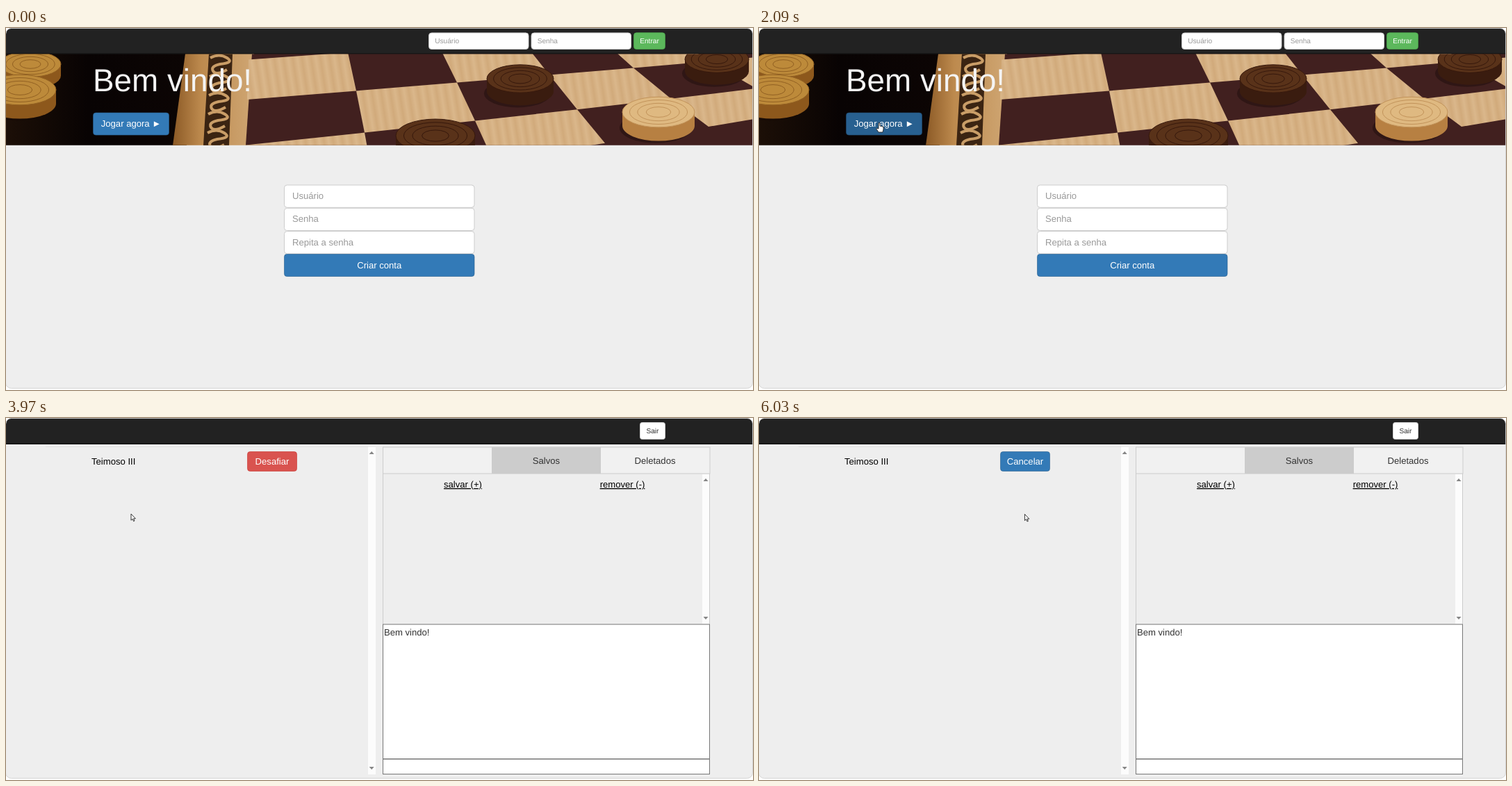
These frames come from a looping animation (1075x521 px, 8 s). An HTML page:

```html
<!DOCTYPE html>
<html lang="pt">
<head>
<meta charset="utf-8">
<title>Damas</title>
<style>
  html, body { margin: 0; width: 100%; height: 100%; overflow: hidden; background: #fff; }
  svg { display: block; font: 13.1px "Liberation Sans", Arial, sans-serif; fill: #333; text-rendering: geometricPrecision; }
  .small { font-size: 10.15px; }
  .mid { text-anchor: middle; }
  .hint { fill: #999; }
  .white { fill: #fff; }
  .field { fill: #fff; stroke: #ccc; }
  .link { fill: #000; text-decoration: underline; }
  .bar { fill: #fcfcfc; }
  .tri { fill: #858585; }
  .box { fill: #fff; stroke: #767676; }
  .pointer { fill: #fff; stroke: #222; stroke-width: .9; stroke-linejoin: round; }
</style>
</head>
<body>
<svg width="1075" height="521" viewBox="0 0 1075 521">
  <defs>
    <clipPath id="page"><rect y=".5" width="1074.5" height="518" rx="8"/></clipPath>
    <clipPath id="strip"><rect y="37.5" width="1074.5" height="131.2"/></clipPath>
    <linearGradient id="grain" gradientUnits="userSpaceOnUse" x2="13" y2="-2" spreadMethod="repeat">
      <stop stop-color="#dab78b"/><stop offset=".5" stop-color="#d1aa7b"/><stop offset="1" stop-color="#dab78b"/>
    </linearGradient>
    <linearGradient id="rim">
      <stop stop-color="#8c5a26"/><stop offset=".35" stop-color="#bd8a4e"/><stop offset="1" stop-color="#cfa673"/>
    </linearGradient>
    <linearGradient id="shade">
      <stop stop-color="#1c0f07"/><stop offset=".45" stop-color="#080303"/><stop offset="1" stop-color="#0c0504"/>
    </linearGradient>
  </defs>

  <g clip-path="url(#page)">
    <rect width="1075" height="521" fill="#eee"/>
    <rect width="1075" height="38" fill="#222"/>
    <rect y="36.5" width="1075" height="1" fill="#0c0c0c"/>
  </g>

  <g id="home">
    <g id="photo" clip-path="url(#strip)"></g>
    <g id="forms"></g>
    <text x="125" y="91" font-size="45.8" fill="#f4f4f4">Bem vindo!</text>
    <g id="play"></g>
  </g>

  <g id="lobby">
    <rect class="field" x="912.5" y="6.5" width="36" height="24" rx="3"/>
    <text class="small mid" x="930.5" y="22">Sair</text>

    <path d="M57 41.5H521" stroke="#e2e2e2"/>
    <text x="123" y="67" fill="#000">Teimoso III</text>
    <g id="duel"></g>
    <rect class="bar" x="521" y="42" width="11" height="471"/>
    <path class="tri" d="M522.7 52h7l-3.5-4zM522.7 502h7l-3.5 4z"/>

    <rect x="542.5" y="42" width="470.5" height="38" fill="#f1f1f1" stroke="#ccc"/>
    <rect x="699" y="42" width="157" height="38" fill="#ccc"/>
    <text class="mid" x="777.5" y="65.5">Salvos</text>
    <text class="mid" x="934" y="65.5">Deletados</text>
    <path d="M542.5 80V296.5M1012.5 80V296.5" stroke="#ccc"/>
    <rect class="bar" x="1002" y="81" width="10" height="215"/>
    <path class="tri" d="M1003.5 91h7l-3.5-4zM1003.5 286h7l-3.5 4z"/>
    <text class="link mid" x="657.5" y="100">salvar (+)</text>
    <text class="link mid" x="887" y="100">remover (-)</text>

    <rect class="box" x="542.5" y="297" width="470" height="193.5"/>
    <rect class="box" x="542.5" y="491" width="470" height="21.5"/>
    <text x="544" y="312.5">Bem vindo!</text>
  </g>

  <rect y=".5" x="-.5" width="1075" height="518" rx="8" fill="none" stroke="#ccc" stroke-opacity=".8"/>

  <circle id="glow" r="9" fill="#e3ac17"/>
  <g id="cursor">
    <path id="arrow" class="pointer" d="M.4 .4V9.6L2.5 7.7 4 11 5.4 10.4 4 7.2H6.8Z"/>
    <path id="hand" class="pointer" d="M-1 1Q0-.7 1 1V5L6 6.2V10L5 14H-1L-4 9.3Q-4 7.2-1 9Z"/>
    <path id="beam" d="M-2-4.5H-.5L0-4 .5-4.5H2M0-4V4M-2 4.5H-.5L0 4 .5 4.5H2" fill="none" stroke="#ccc" stroke-width=".9"/>
  </g>
</svg>
<script>
const $ = id => document.getElementById(id);
const show = (id, on) => $(id).style.display = on ? '' : 'none';
const poly = (points, fill) => `<polygon points="${points.join(' ')}" fill="${fill}"/>`;

const BLUE = ['#337ab7', '#286090', '#204d74'];
const RED = ['#d9534f', '#c9302c', '#ac2925'];
const GREEN = ['#5cb85c', '#4cae4c'];
const DARK = ['#3a1c0f', '#593219', '#36180c'];
const AMBER = ['#8d581c', '#bd8a3a', '#916022'];
const PALE = ['#b78042', '#dfb981', '#c2935a'];
const PLAY = [125, 121.5, 110, 33], DUEL = [347, 48, 72, 29];

// A draughtsman seen at the same slant everywhere, only its size differs
function piece(x, y, r, [side, top, line]) {
  const ry = r * .42, h = r * .38;
  const ring = (k, fill) =>
    `<ellipse cx="${x}" cy="${y}" rx="${r * k}" ry="${ry * k}" fill="${fill}" stroke="${line}"/>`;
  return `<ellipse cx="${x - 4}" cy="${y + h + 3}" rx="${r}" ry="${ry}" fill="#140806" opacity=".4"/>
    <path d="M${x - r} ${y}v${h}a${r} ${ry} 0 0 0 ${2 * r} 0v${-h}z" fill="${side}"/>`
    + ring(1, top) + [.8, .58, .34].map(k => ring(k, 'none')).join('');
}

// Corner of the board squares: column c, row r, in perspective
const corner = (c, r) => [
  347 + 163 * c - 6 * c * c + r * (14 * c - 2),
  103 - 13 * c + .4 * c * c + r * (61.5 - 3.8 * c) + r * r * (4 - 1.5 * c)
];

function photo() {
  let s = '<rect y="37" width="260" height="132" fill="url(#shade)"/>';
  s += poly([[258, 37], [357, 37], [346, 169], [240, 169]], 'url(#rim)');
  s += poly([[292, 37], [326, 37], [321, 169], [284, 169]], '#3b2412');
  for (let i = 0; i < 5; i++)
    s += `<path d="M${294 - i} ${43 + i * 27}q13-7 24 0t-10 9q-14 3-10 10t20-2" fill="none" stroke="#c99d67" stroke-width="4"/>`;
  s += poly([[354, 37], [1075, 37], [1075, 169], [345, 169]], '#41201f');
  for (let r = -1; r < 2; r++)
    for (let c = 0; c < 6; c++)
      if ((r + c) % 2)
        s += poly([corner(c, r), corner(c + 1, r), corner(c + 1, r + 1), corner(c, r + 1)], 'url(#grain)');
  return s + piece(35, 52, 44, AMBER) + piece(20, 89, 52, AMBER)
    + piece(740, 73, 48, DARK) + piece(618, 155, 57, DARK)
    + piece(1023, 45, 46, DARK) + piece(939, 121, 52, PALE);
}

// level: 0 normal, 1 hover, 2 pressed; focus adds the double outline
function button([x, y, w, h], label, colors, level = 0, focus = false, css = '') {
  const frame = (d, fill, stroke, width = 1) =>
    `<rect x="${x + d}" y="${y + d}" width="${w - 2 * d}" height="${h - 2 * d}" rx="${4 - d / 2}" fill="${fill}" stroke="${stroke}" stroke-width="${width}"/>`;
  return frame(.5, colors[level], colors[Math.min(level + 1, colors.length - 1)] + 'a0')
    + (focus ? frame(1, 'none', '#fff') + frame(2, 'none', '#14171c', 1.2) : '')
    + `<text class="white mid ${css}" x="${x + w / 2}" y="${y + h / 2 + (css ? 3.5 : 4.4)}">${label}</text>`;
}

const input = (x, y, w, h, pad, label, css = '') =>
  `<rect class="field" x="${x}" y="${y}" width="${w}" height="${h}" rx="4"/>
   <text class="hint ${css}" x="${x + pad}" y="${y + h / 2 + (css ? 3.4 : 3.9)}">${label}</text>`;

const forms = () =>
  ['Usuário', 'Senha'].map((s, i) => input(608.5 + i * 147.5, 7, 143.5, 23.5, 8.7, s, 'small')).join('')
  + ['Usuário', 'Senha', 'Repita a senha'].map((s, i) => input(400.5, 226 + i * 33.3, 273.5, 32.3, 11.5, s)).join('')
  + button([903, 6.3, 46, 24.7], 'Entrar', GREEN, 0, false, 'small')
  + button([400, 325, 274.5, 33], 'Criar conta', BLUE);

// Each move: start, end, where to, sideways bow of the way there
const moves = [
  [380, 720, 860, 378, 0],
  [1130, 1690, 131, 100, -120],
  [1690, 2090, 173, 136, 0],
  [3880, 4740, 384, 62, 40],
  [5540, 6030, 382, 138, 0]
];

function position(t) {
  let x = 1040, y = 521;
  for (const [from, to, x1, y1, bow] of moves) {
    const u = Math.min(1, Math.max(0, (t - from) / (to - from)));
    const k = u * u * (3 - 2 * u);
    x += (x1 - x) * k;
    y += (y1 - y) * k + bow * Math.sin(Math.PI * k);
  }
  return [x, y];
}

const inside = (px, py, [x, y, w, h]) => px > x && px < x + w && py > y && py < y + h;

function draw(t) {
  const home = t < 2910, [x, y] = position(t);
  const over = inside(x, y, home ? PLAY : DUEL);
  show('home', home);
  show('lobby', !home);

  if (home) {
    const pressed = t >= 2510;
    $('play').innerHTML = button(PLAY, 'Jogar agora ►', BLUE, +over, pressed);
  } else if (t < 5330) {
    const pressed = t >= 5190;
    $('duel').innerHTML = button(DUEL, 'Desafiar', RED, pressed ? 2 : +over, pressed);
  } else {
    $('duel').innerHTML = button(DUEL, 'Cancelar', BLUE, +over);
  }

  show('glow', t >= 2510 && t < 2700 || t >= 5190 && t < 5330);
  $('glow').setAttribute('transform', `translate(${x} ${y})`);
  $('glow').setAttribute('opacity', home ? .8 * (1 - (t - 2510) / 260) : .8);

  const hand = over && (home ? t < 2700 : t >= 4800);
  const beam = home && inside(x, y, [125, 45, 824, 62]);
  show('cursor', t >= 450);
  show('hand', hand);
  show('beam', beam);
  show('arrow', !hand && !beam);
  $('cursor').setAttribute('transform', `translate(${x} ${y})`);
}

$('photo').innerHTML = photo();
$('forms').innerHTML = forms();
const start = performance.now();
function tick() {
  draw((performance.now() - start) % 8000);
  requestAnimationFrame(tick);
}
tick();
</script>
</body>
</html>
```
